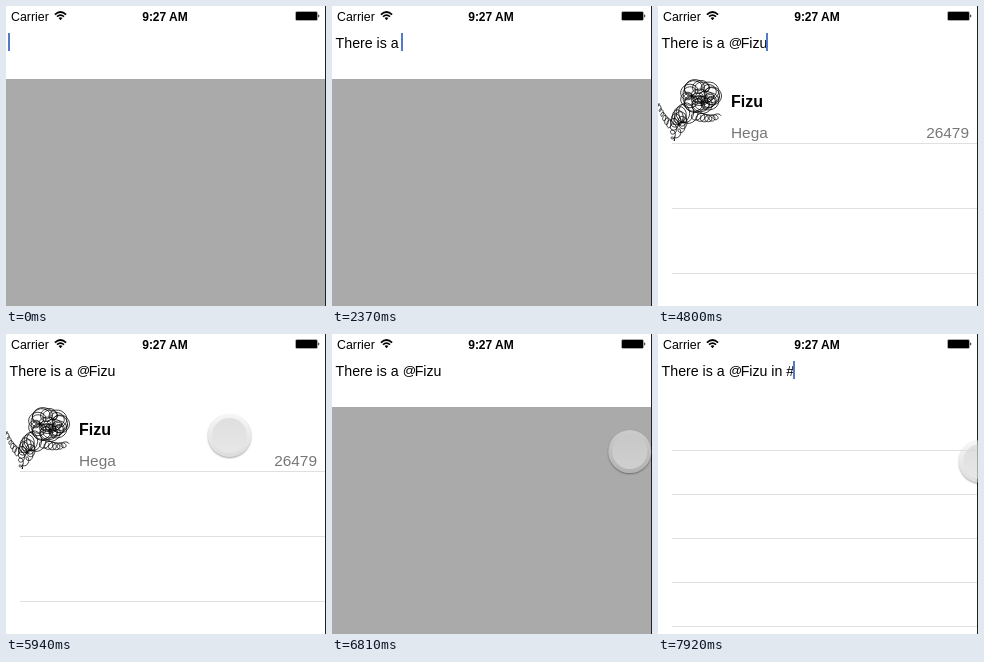
Write an HTML page that moves like this. It is 320x300 px and loops after 8000 ms.

```html
<!DOCTYPE html>
<html lang="en">
<head>
<meta charset="utf-8">
<title>Mention search</title>
<style>
  html, body { margin: 0; width: 100%; height: 100%; overflow: hidden; background: #fff; }
  body { font-family: "Liberation Sans", Arial, sans-serif; color: #000; }
  #stage { position: absolute; left: 0; top: 0; width: 320px; height: 300px; overflow: hidden; background: #fff; }
  #stage > * { position: absolute; }
  svg { display: block; overflow: visible; }
  .field { left: 3.6px; top: 27px; font-size: 14.2px; line-height: 20px; white-space: pre; }
  #at { font-size: 13.2px; letter-spacing: -1.4px; line-height: 0; vertical-align: .6px; }
  #caret { display: inline-block; width: 2px; height: 18px; margin-left: -1.2px; vertical-align: -3px; background: #5379cb; }
  .shade, #table { left: 0; top: 73px; width: 319px; height: 227px; }
  .shade { background: #aaa; }
  #table { --row: 44px; background: #fff; }
  #table.filled { --row: 65px; }
  #table::before {
    content: ""; position: absolute; inset: 0 0 0 14px;
    background: repeating-linear-gradient(transparent 0 calc(var(--row) - 1px), #e0e0e0 calc(var(--row) - 1px) var(--row));
  }
  .row { position: absolute; left: 0; width: 319px; height: 65px; }
  #second { top: 65px; }
  .row text { font-size: 15.4px; fill: #777; }
  .row .title { font-size: 16px; font-weight: bold; fill: #000; }
  .edge { left: 319px; top: 0; width: 1px; height: 300px; background: #222; }
  #touch {
    left: -21.5px; top: -21.5px; width: 43px; height: 43px; border-radius: 50%;
    background: linear-gradient(rgba(238, 238, 238, .5), rgba(186, 186, 186, .5));
    box-shadow: 0 1px 2px rgba(0, 0, 0, .38);
  }
  #touch::after {
    content: ""; position: absolute; inset: 4px; border-radius: 50%;
    background: linear-gradient(rgba(197, 197, 197, .45), rgba(240, 240, 240, .45));
  }
</style>
</head>
<body>
<div id="stage">
  <svg width="320" height="24">
    <text x="5" y="14.5" font-size="12.4">Carrier</text>
    <text x="159" y="14.5" font-size="12" font-weight="bold" text-anchor="middle">9:27 AM</text>
    <g fill="none" stroke="#000" stroke-width="1.7">
      <path d="M48.9 8.6Q54.5 3.4 60.1 8.6M51 10.7Q54.5 7.4 58 10.7"/>
      <path d="M52.6 12.1Q54.5 10.4 56.4 12.1L54.5 14.2Z" fill="#000" stroke="none"/>
    </g>
    <rect x="289.5" y="5.5" width="22" height="9" rx="1.5" fill="none" stroke="#aaa"/>
    <rect x="290" y="6" width="21" height="8" rx=".6"/>
    <path d="M312.3 8.3Q314.4 10 312.3 11.7Z"/>
  </svg>
  <div class="field"><span id="before"></span><span id="at"></span><span id="after"></span><i id="caret"></i></div>
  <div class="shade"></div>
  <div id="table">
    <svg class="row" id="first"></svg>
    <svg class="row" id="second"></svg>
  </div>
  <div class="edge"></div>
  <div id="touch"></div>
</div>
<script>
const $ = id => document.getElementById(id);
const LOOP = 8000, FADE = 120;

// Bursts of typing: start, characters, time between keys
const bursts = [
  [300, "The", 165], [990, "re", 0], [1200, " is a", 112], [2040, " ", 0],
  [2850, "@", 0], [3150, "F", 0], [3960, "i", 0], [4170, "zu", 150],
  [6900, " in ", 130], [7800, "#", 0]
];
const keys = bursts.flatMap(([start, text, step]) =>
  [...text].map((char, i) => ({ char, time: start + i * step })));

// Spans in which the caret is off, faded at both ends
const caretOff = [[2040, 2220], [3240, 3420], [4800, 5280], [5790, 6840]];

// The pointer's strokes; it rests at the end of each
const strokes = [
  { start: 180, end: 690, path: [[350, 144], [295, 86], [350, 29]] },
  { start: 5280, end: 5880, path: [[350, 34], [250, 60], [223, 101]] },
  { start: 6420, end: 7170, path: [[223, 101], [318, 119], [322, 127]] }
];

const clamp = v => Math.min(1, Math.max(0, v));

function bezier([a, b, c], p) {
  const q = 1 - p;
  return a.map((v, i) => q * q * v + 2 * q * p * b[i] + p * p * c[i]);
}

function caretOpacity(t) {
  return 1 - Math.max(...caretOff.map(([a, b]) =>
    Math.min(clamp((t - a) / FADE), clamp((b + FADE - t) / FADE))));
}

function pointer(t) {
  const { start, end, path } = strokes.findLast(s => s.start <= t) || strokes[0];
  return bezier(path, clamp((t - start) / (end - start)));
}

// Pen line that loops while its centre follows a path
function loops(turns, centre, radius, squash = 1) {
  const steps = turns * 18;
  const points = Array.from({ length: steps + 1 }, (_, i) => {
    const p = i / steps, a = p * turns * 2 * Math.PI;
    const [x, y] = centre(p), r = radius(p);
    return (x + r * Math.cos(a)).toFixed(1) + " " + (y + r * squash * Math.sin(a)).toFixed(1);
  });
  return "M" + points.join("L");
}

const along = (...path) => p => bezier(path, p);
const ring = (x, y, rx, ry, rounds) => p => {
  const a = p * rounds * 2 * Math.PI;
  return [x + rx * Math.cos(a), y + ry * Math.sin(a)];
};

function sketch(wobble) {
  return [
    loops(23, ring(42, 17, 13, 10, 2.3), p => 6.5 + 2 * Math.sin(p * 47 + wobble), .9),
    loops(7, ring(43, 18, 5, 4, 1.4), p => 6 + 2 * Math.sin(p * 29 + wobble), .6),
    loops(9, along([31, 34], [14, 32], [15, 62]), p => 9 - 7.5 * p, 1.2),
    loops(5, along([20, 38], [32, 42], [15, 62]), p => 6 - 5 * p, 1.3),
    loops(6, along([0, 24], [5, 40], [13, 46]), p => 1 + 2 * p, 1.6),
    loops(6, along([37, 36], [50, 42], [60, 37]), p => 6 - 3 * p, .8)
  ].join("");
}

function rowMarkup(title, note, count, wobble) {
  return `<path d="${sketch(wobble)}" fill="none" stroke="#000" stroke-width=".75"/>
  <text class="title" x="73" y="28">${title}</text>
  <text x="73" y="58.5">${note}</text>
  <text x="311" y="58.5" text-anchor="end">${count}</text>`;
}

$("first").innerHTML = rowMarkup("Fizu", "Hega", "26479", 0);
$("second").innerHTML = rowMarkup("Fimba", "Hega", "18350", 1.5);

const show = (el, on) => { el.style.visibility = on ? "visible" : "hidden"; };

function draw(now) {
  const t = now % LOOP;
  const typed = keys.filter(k => k.time <= t).map(k => k.char).join("");
  const [, before, at, after] = typed.match(/^([^@]*)(@?)(.*)$/);
  $("before").textContent = before;
  $("at").textContent = at;
  $("after").textContent = after;
  $("caret").style.opacity = caretOpacity(t);

  const filled = t >= 3420 && t < 5970;
  show($("table"), t >= 3360 && t < 5970 || t >= 7830);
  $("table").classList.toggle("filled", filled);
  show($("first"), filled);
  show($("second"), filled && t < 4230);

  const [x, y] = pointer(t);
  $("touch").style.transform = `translate(${x}px, ${y}px)`;
  requestAnimationFrame(draw);
}
draw(performance.now());
</script>
</body>
</html>
```
